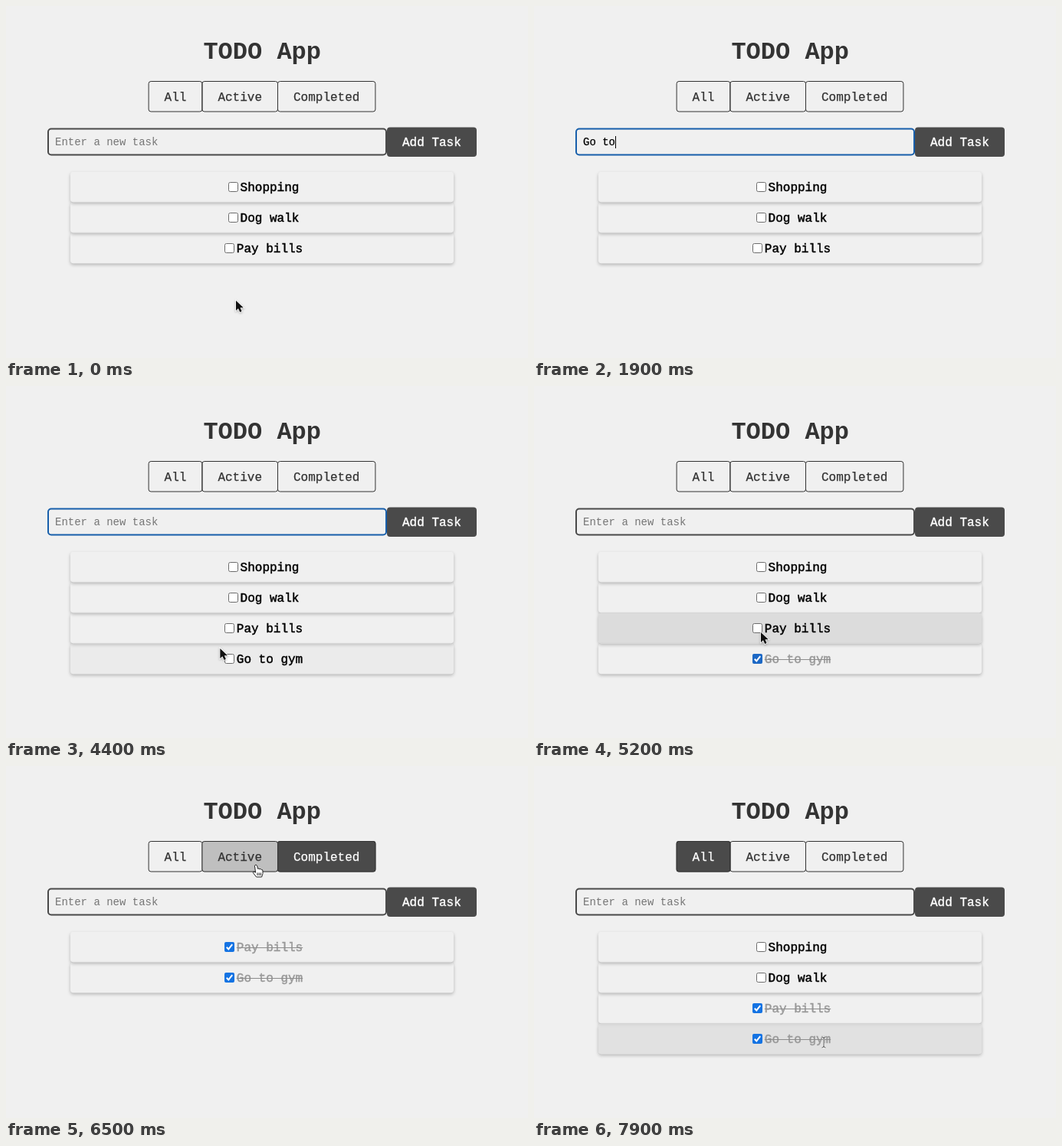
An HTML page with a canvas for the animation above (8 s loop, 681 px wide and 460 px high).

```html
<!DOCTYPE html>
<html lang="en">
<head>
<meta charset="utf-8">
<title>TODO App</title>
<style>
html, body { margin: 0; width: 100%; height: 100%; overflow: hidden; background: #f0f0f0; }
canvas { display: block; }
</style>
</head>
<body>
<canvas id="stage" width="681" height="460"></canvas>
<script>
const ctx = document.getElementById('stage').getContext('2d');
const LOOP = 8000, STEP = 100;
const FONT = '"Courier New", "Liberation Mono", monospace';
const DARK = '#4a4a4a', INK = '#333';

const FOCUS = 700, SUBMIT = 3300, BLUR = 4600;
const GYM_DONE = 4600, BILLS_DONE = 5300;
const SHOW_DONE = 5800, SHOW_ACTIVE = 6700, SHOW_ALL = 7400;
const KEYS = [1500, 1600, 1700, 1800, 1900, 2200, 2400, 2500, 2600];
const CARET = [[700, 1200], [1500, 3100], [3600, 4100]];

// hover and active are [start, end] in ms
const TABS = [
  { label: 'All', x: 185.6, w: 70.8, hover: [7300, 7500], active: [SHOW_ALL, Infinity] },
  { label: 'Active', x: 255.4, w: 99.6, hover: [6410, 6900], active: [SHOW_ACTIVE, 7390] },
  { label: 'Completed', x: 354, w: 128.4, hover: [5650, 6300], active: [SHOW_DONE, SHOW_ACTIVE] }
];

const TASKS = [
  { name: 'Shopping', done: Infinity, hover: [] },
  { name: 'Dog walk', done: Infinity, hover: [] },
  { name: 'Pay bills', done: BILLS_DONE, hover: [[4650, 5550]] },
  { name: 'Go to gym', done: GYM_DONE, hover: [[4350, 4650], [7750, Infinity]] }
];

// time, x, y, shape
const POINTER = [
  [0, 300, 385, 'arrow'],
  [500, 121, 180, 'beam'],
  [1300, 121, 180, ''],
  [3900, 121, 180, 'arrow'],
  [4500, 292, 356, 'arrow'],
  [4600, 292, 356, 'arrow'],
  [4800, 296, 326, 'arrow'],
  [5200, 296, 322, 'arrow'],
  [5400, 296, 321, 'arrow'],
  [5700, 420, 120, 'hand'],
  [6100, 420, 118, 'hand'],
  [6500, 326, 129, 'hand'],
  [6700, 326, 128, 'hand'],
  [7000, 326, 110, 'hand'],
  [7200, 262, 101, 'hand'],
  [7300, 262, 101, 'hand'],
  [7400, 226, 115, 'hand'],
  [7500, 252, 155, 'arrow'],
  [7800, 378, 361, 'beam'],
  [8000, 378, 361, 'beam']
];

const clamp = v => Math.max(0, Math.min(1, v));
const within = (t, [a, b]) => t >= a && t < b;
const fade = (t, [a, b], d) => clamp((t - a) / d) - clamp((t - b) / d);

function text(str, x, y, color, size = 16, weight = 'normal', extra = 0) {
  ctx.font = `${weight} ${size}px ${FONT}`;
  ctx.fillStyle = color;
  ctx.fillText(str, x, y);
  if (extra) {
    ctx.strokeStyle = color;
    ctx.lineWidth = extra;
    ctx.strokeText(str, x, y);
  }
}

function box(x, y, w, h, r, fill, line, lw = 1) {
  ctx.beginPath();
  ctx.roundRect(x, y, w, h, r);
  if (fill) {
    ctx.fillStyle = fill;
    ctx.fill();
  }
  if (line) {
    ctx.strokeStyle = line;
    ctx.lineWidth = lw;
    ctx.stroke();
  }
}

function withAlpha(a, draw) {
  if (a <= 0) return;
  ctx.globalAlpha = a;
  draw();
  ctx.globalAlpha = 1;
}

function drawTab(tab, t) {
  const { x, w } = tab;
  const fill = c => box(x, 98, w, 40.5, 3, c);
  withAlpha(fade(t, tab.hover, 100), () => fill('#bbb'));
  withAlpha(fade(t, tab.active, 200), () => fill(DARK));
  box(x + .5, 98.5, w - 1, 39.5, 3, null, INK);
  text(tab.label, x + 21, 124, within(t, tab.active) ? '#fff' : INK, 16, 'normal', .25);
}

function drawForm(t) {
  const focused = within(t, [FOCUS, BLUR]);
  box(55, 160.5, 441, 34, 4, null, focused ? '#175fab' : DARK, 2);
  box(497, 158.5, 117, 38.5, 4, DARK);
  text('Add Task', 517, 183, '#fff', 16, 'normal', .4);

  const n = t < SUBMIT ? KEYS.filter(k => k <= t).length : 0;
  if (n) text('Go to gym'.slice(0, n), 64, 182, '#000', 14, 'normal', .25);
  else text('Enter a new task', 64, 182, '#757575', 14);
  if (CARET.some(c => within(t, c))) {
    ctx.fillStyle = '#000';
    ctx.fillRect(64 + Math.round(8.4 * n), 170, 1, 16);
  }
}

function rowShadow(y) {
  ctx.save();
  ctx.beginPath();
  ctx.rect(0, 0, 681, 460);
  ctx.roundRect(84, y, 500, 39.5, 4);
  ctx.clip('evenodd');
  ctx.shadowColor = 'rgba(0,0,0,.25)';
  ctx.shadowBlur = 4;
  ctx.shadowOffsetY = 2;
  box(84, y, 500, 39.5, 4, '#f0f0f0');
  ctx.restore();
}

function drawCheck(x, y, done, color) {
  if (!done) return box(x + .5, y + .5, 12, 12, 2, '#fff', '#6c6c6c');
  box(x, y, 13, 13, 2, color);
  ctx.beginPath();
  ctx.moveTo(x + 2.8, y + 6.8);
  ctx.lineTo(x + 5.3, y + 9.4);
  ctx.lineTo(x + 10.2, y + 3.2);
  ctx.strokeStyle = '#fff';
  ctx.lineWidth = 2;
  ctx.stroke();
}

function drawRow(task, i, t) {
  const y = 216.7 + 40 * i, w = task.name.length * 9.6;
  const left = 334 - (w + 20) / 2 + 4, done = t >= task.done;
  const lit = task.hover.reduce((s, h) => s + fade(t, h, 200), 0);
  rowShadow(y);
  withAlpha(lit, () => box(84, y, 500, 39.9, 4, '#dcdcdc'));
  drawCheck(Math.round(left), 230 + 40 * i, done, t < BILLS_DONE ? '#1c68c5' : '#1473e3');
  const base = 242 + 40 * i;
  text(task.name, left + 16, base, done ? '#999' : '#000', 16, 'normal', .45);
  if (done) {
    ctx.fillStyle = '#8c8c8c';
    ctx.fillRect(left + 16, base - 5, w, 1);
  }
}

function visibleTasks(t) {
  if (t < SUBMIT) return TASKS.slice(0, 3);
  if (within(t, [SHOW_DONE, SHOW_ACTIVE])) return TASKS.filter(k => t >= k.done);
  if (within(t, [SHOW_ACTIVE, SHOW_ALL])) return TASKS.filter(k => t < k.done);
  return TASKS;
}

const SHAPES = {
  arrow() {
    const p = new Path2D('M0 0V13L3 10.2L5.2 15L7.6 14L5.5 9.3H9.8Z');
    ctx.shadowColor = 'rgba(0,0,0,.3)';
    ctx.shadowBlur = 3;
    ctx.shadowOffsetY = 1;
    ctx.strokeStyle = '#fff';
    ctx.lineWidth = 1.6;
    ctx.stroke(p);
    ctx.shadowColor = 'transparent';
    ctx.fillStyle = '#111';
    ctx.fill(p);
  },
  hand() {
    const p = new Path2D('M-1.6 1.2Q0 -1 1.5 1.2L2.6 5.4Q4 4.2 5 5.8Q6.5 4.8 7.2 6.5' +
      'Q8.8 6 9 8V11.5L7.6 16H0.6L-3.6 10.6Q-4 8.6 -2 9.2L-0.4 10.2Z');
    ctx.fillStyle = '#fff';
    ctx.fill(p);
    ctx.strokeStyle = '#222';
    ctx.lineWidth = 1;
    ctx.stroke(p);
    ctx.stroke(new Path2D('M2 10.5V14M4.2 10.5V14M6.3 10.5V14'));
  },
  beam() {
    const p = new Path2D('M-2.5 -7Q0 -7 0 -5V5Q0 7 -2.5 7M2.5 -7Q0 -7 0 -5M0 5Q0 7 2.5 7');
    ctx.strokeStyle = 'rgba(255,255,255,.8)';
    ctx.lineWidth = 2.4;
    ctx.stroke(p);
    ctx.strokeStyle = '#555';
    ctx.lineWidth = 1;
    ctx.stroke(p);
  }
};

function drawPointer(t) {
  const i = POINTER.findIndex(p => p[0] > t) - 1;
  const [t0, x0, y0, shape] = POINTER[i], [t1, x1, y1] = POINTER[i + 1];
  if (!shape) return;
  const u = (t - t0) / (t1 - t0), e = u * u * (3 - 2 * u);
  ctx.save();
  ctx.translate(x0 + (x1 - x0) * e, y0 + (y1 - y0) * e);
  SHAPES[shape]();
  ctx.restore();
}

function draw(t) {
  ctx.fillStyle = '#f0f0f0';
  ctx.fillRect(0, 0, 681, 460);
  text('TODO App', 257.4, 69, INK, 32, 'bold');
  TABS.forEach(tab => drawTab(tab, t));
  drawForm(t);
  visibleTasks(t).forEach((task, i) => drawRow(task, i, t));
  drawPointer(t);
}

const start = performance.now();
function tick() {
  const t = (performance.now() - start) % LOOP;
  draw(Math.floor(t / STEP) * STEP);
  requestAnimationFrame(tick);
}
tick();
</script>
</body>
</html>
```
